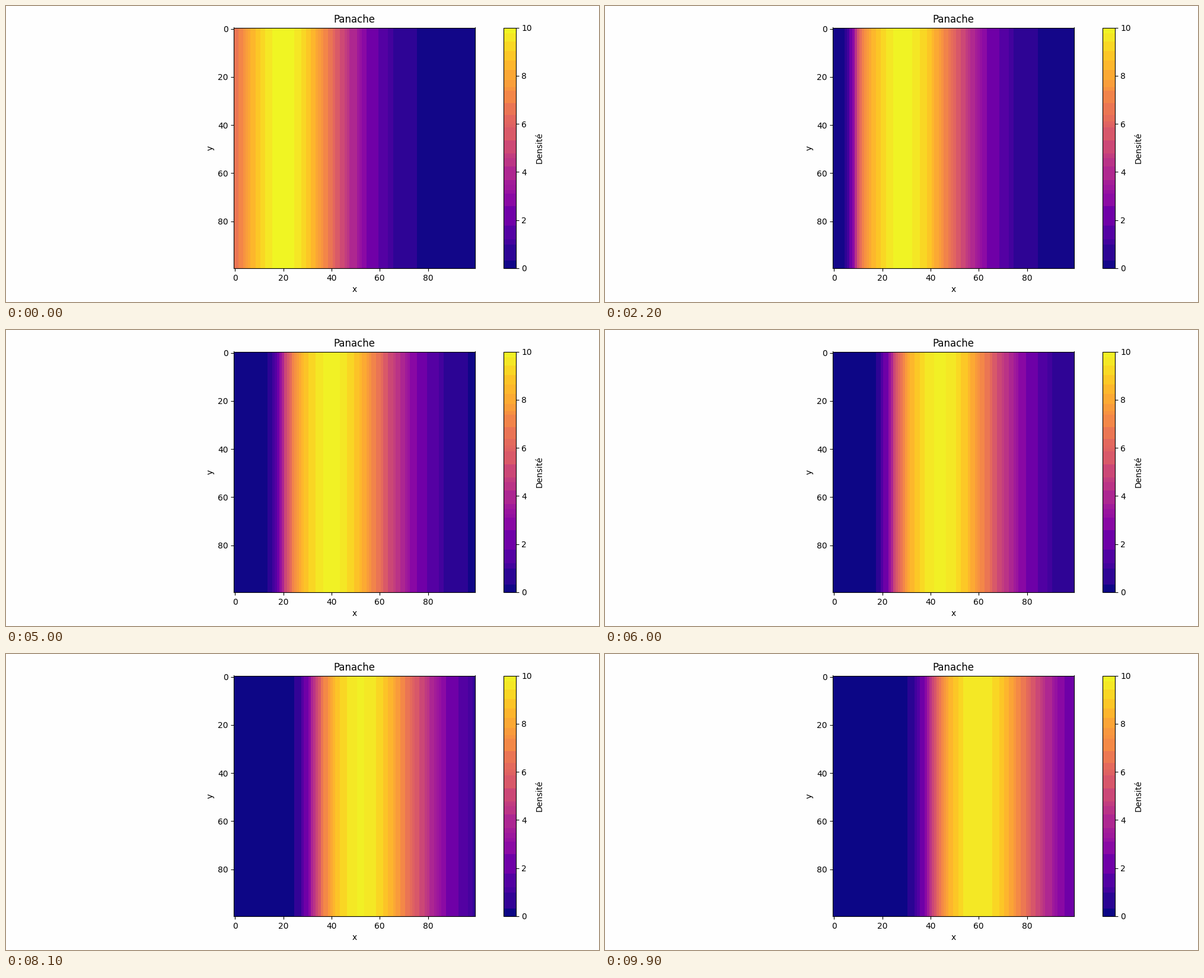
These frames come from a looping animation (1000 px wide and 500 px high, 10000 ms). A matplotlib script:

```python
import matplotlib.pyplot as plt
import numpy as np
from matplotlib.animation import FuncAnimation
from matplotlib.colors import ListedColormap

W, H, DPI = 1000, 500, 100
N = 100            # grid cells per side
FRAMES = 100
STEP_MS = 100
CFL = 0.4          # cells travelled per time step
PEAK = 10
SIDE = 406.4       # plot side in pixels
BAR_W = SIDE / 20

plt.rcParams["font.family"] = "DejaVu Sans"


def simulate():
    """Upwind advection of a Gaussian plume with clean air entering on the left."""
    x = np.arange(N)
    u = PEAK * np.exp(-((x - 20) / 30) ** 2)
    states = [u]
    for _ in range(FRAMES - 1):
        upstream = np.concatenate(([0], u[:-1]))
        u = u - CFL * (u - upstream)
        states.append(u)
    return states


# Plasma grouped into coarse colour cells: 3 bits red, 4 green, 3 blue
PLASMA = (plt.get_cmap("plasma")(np.arange(256))[:, :3] * 255).astype(int)
CELLS = (PLASMA[:, 0] >> 5) * 128 + (PLASMA[:, 1] >> 4) * 8 + (PLASMA[:, 2] >> 5)
BAND = np.unique(CELLS, return_inverse=True)[1].ravel()


def banded_cmap(u):
    """Each band takes the mean colour of the area it covers on screen."""
    index = np.clip((u / PEAK * 256).astype(int), 0, 255)
    area = np.bincount(index, minlength=256) * SIDE * SIDE / N
    area = area + BAR_W * SIDE / 256
    total = np.bincount(BAND, area)
    means = [np.bincount(BAND, area * PLASMA[:, c]) / total for c in range(3)]
    return ListedColormap(np.floor(np.stack(means, axis=1) + 1e-6)[BAND] / 255)


def add_axes(left, top, width, height):
    return fig.add_axes((left / W, 1 - (top + height) / H, width / W, height / H))


STATES = simulate()

fig = plt.figure(figsize=(W / DPI, H / DPI), dpi=DPI, facecolor="#fefefe")
ax = add_axes(384.4, 36.5, SIDE, SIDE)
cax = add_axes(839.3, 36.5, BAR_W, SIDE)

field = ax.imshow(np.tile(STATES[0], (N, 1)), cmap=banded_cmap(STATES[0]),
                  vmin=0, vmax=PEAK, interpolation="nearest", aspect="auto")
ax.set_title("Panache")
ax.set_xlabel("x")
ax.set_ylabel("y")
ax.set_xticks(range(0, 100, 20))
ax.set_yticks(range(0, 100, 20))
fig.colorbar(field, cax=cax, label="Densité")


def update(i):
    u = STATES[i]
    field.set_data(np.tile(u, (N, 1)))
    field.set_cmap(banded_cmap(u))
    return (field,)


anim = FuncAnimation(fig, update, frames=FRAMES, interval=STEP_MS,
                     init_func=lambda: update(0), repeat=True, repeat_delay=0)
plt.show()
```
